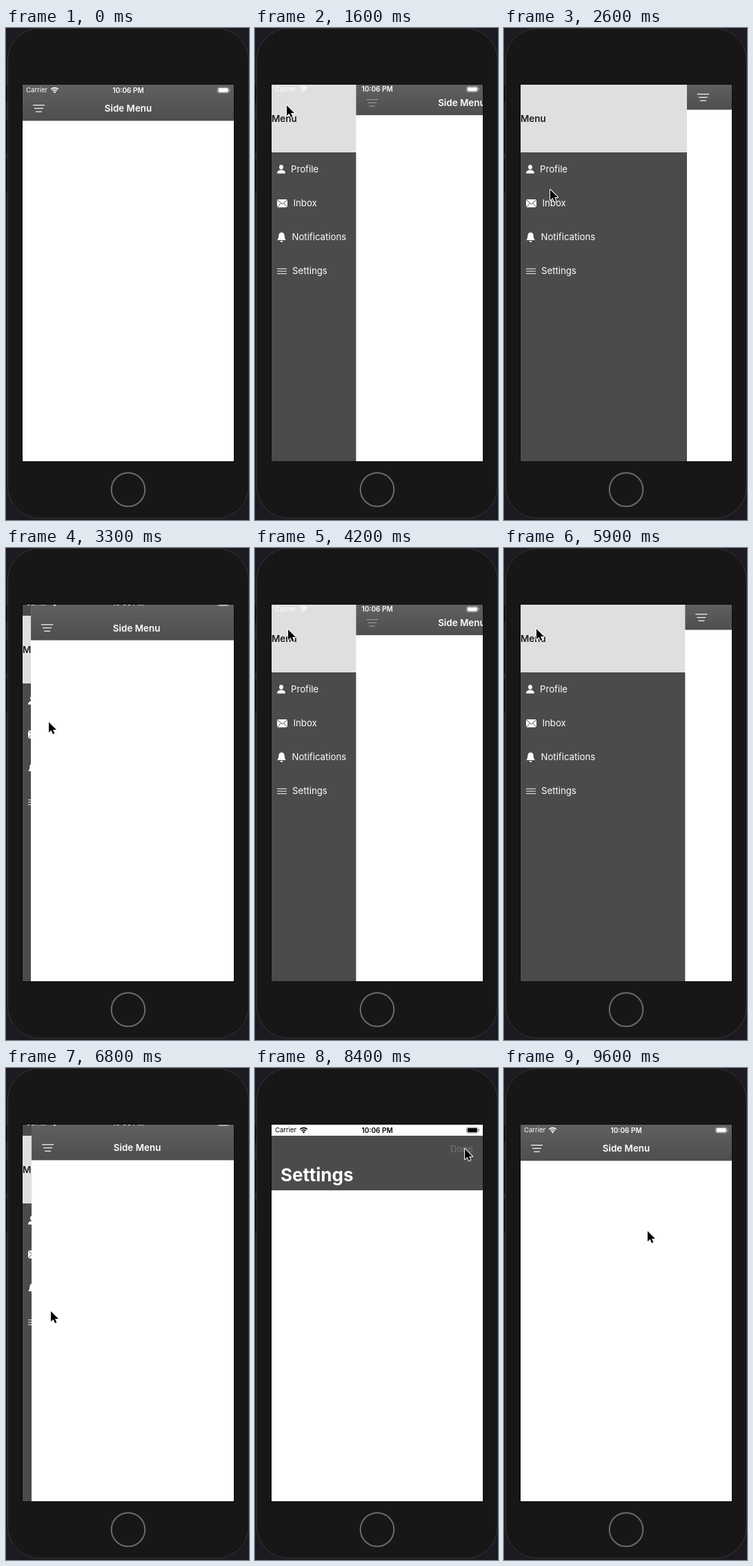
These frames come from a looping animation (352x712 px, 9.7 s). An HTML page with a canvas:

```html
<!DOCTYPE html>
<html lang="en">
<head>
<meta charset="utf-8">
<title>Side Menu</title>
<style>
  html, body { margin: 0; width: 100%; height: 100%; overflow: hidden; background: #1b1b21; }
  canvas { display: block; width: 352px; height: 712px; }
</style>
</head>
<body>
<canvas id="stage"></canvas>
<script>
const LOOP = 9700, STEP = 100, SLIDE = 335, MENU_WIDTH = 241;
const SCREEN = { x: 24, y: 82, w: 306, h: 545 };
const OPENS = [1500, 4100, 5600];
const CLOSES = [3040, 4847, 6543];
// time, x, y of the pointer tip
const POINTER = [
  [100, 120, 608], [400, 96, 400], [800, 58, 165], [1000, 45, 124], [1300, 46, 112],
  [1900, 46, 112], [2500, 66, 231], [2600, 67, 234], [2700, 67, 234], [2900, 62, 252],
  [3300, 62, 252], [4000, 48, 118], [4400, 48, 118], [4800, 68, 202], [5100, 68, 202],
  [5500, 47, 117], [5900, 47, 117], [6400, 65, 352], [7400, 65, 352], [7600, 120, 345],
  [7700, 155, 332], [7900, 238, 240], [8200, 304, 117], [8500, 304, 117],
  [8800, 252, 200], [9100, 214, 228], [9300, 208, 236]
];

const canvas = document.getElementById('stage');
const ctx = canvas.getContext('2d');
const ratio = window.devicePixelRatio || 1;
canvas.width = 352 * ratio;
canvas.height = 712 * ratio;

const clamp = v => Math.min(1, Math.max(0, v));
const easeOut = (v, power = 2) => 1 - (1 - clamp(v)) ** power;

function rect(x, y, w, h, color) {
  ctx.fillStyle = color;
  ctx.fillRect(x, y, w, h);
}

function text(label, x, middle, size, weight, color, align = 'left') {
  ctx.font = `${weight} ${size}px Inter, sans-serif`;
  ctx.textAlign = align;
  ctx.fillStyle = color;
  ctx.fillText(label, x, middle + size * 0.36);
}

function roundRect(x, y, w, h, r) {
  ctx.beginPath();
  ctx.roundRect(x, y, w, h, r);
}

function line(x1, y1, x2, y2, color, width) {
  ctx.strokeStyle = color;
  ctx.lineWidth = width;
  ctx.beginPath();
  ctx.moveTo(x1, y1);
  ctx.lineTo(x2, y2);
  ctx.stroke();
}

function fillPath(path, color) {
  ctx.fillStyle = color;
  ctx.fill(new Path2D(path));
}

function drawPhone() {
  rect(0, 0, 352, 712, '#1b1b21');
  for (const [y, h] of [[83, 25], [134, 47], [190, 48]]) rect(0, y, 4, h, '#09090a');
  roundRect(2.5, 0.5, 349, 709, 46);
  ctx.fillStyle = '#171717';
  ctx.fill();
  ctx.strokeStyle = '#37373a';
  ctx.lineWidth = 1;
  ctx.stroke();
  ctx.strokeStyle = '#6a6a6a';
  ctx.lineWidth = 2;
  ctx.beginPath();
  ctx.arc(177, 668, 24.3, 0, 7);
  ctx.stroke();
  rect(23, 81, 308, 547, '#0b0b0b');
}

function drawStatusBar(color, dy) {
  const y = 90 + dy;
  text('Carrier', 29, y, 9.5, 400, color);
  text('10:06 PM', 177, y, 10, 600, color, 'center');
  ctx.strokeStyle = color;
  ctx.lineWidth = 1.6;
  for (const r of [4.4, 7.4]) {
    ctx.beginPath();
    ctx.arc(70.5, y + 4, r, -Math.PI * 0.75, -Math.PI * 0.25);
    ctx.stroke();
  }
  fillPath(`M70.5 ${y + 4.5}l-2 -2.3q2 -1.6 4 0z`, color);
  roundRect(306.5, y - 4, 16.5, 8, 2.3);
  ctx.globalAlpha = 0.5;
  ctx.lineWidth = 0.9;
  ctx.stroke();
  rect(324, y - 1.3, 1, 2.6, color);
  ctx.globalAlpha = 1;
  roundRect(307.7, y - 2.9, 14.1, 5.8, 1.4);
  ctx.fill();
}

function drawMenu(dy) {
  rect(24, 82, 306, 545, '#4b4b4b');
  ctx.save();
  ctx.translate(0, dy);
  rect(24, 82, MENU_WIDTH, 98, '#dfdfdf');
  text('Menu', 24, 131.5, 13.4, 600, '#1c1c1c');
  text('Profile', 52, 204.5, 13.2, 400, '#fff');
  text('Inbox', 55.5, 253.5, 13.2, 400, '#fff');
  text('Notifications', 53.5, 302.5, 13.2, 400, '#fff');
  text('Settings', 54, 351.5, 13.2, 400, '#fff');

  ctx.fillStyle = '#fff';
  ctx.beginPath();
  ctx.ellipse(38, 201.3, 2.9, 3.4, 0, 0, 7);
  ctx.fill();
  fillPath('M32 210.5q0 -5 6 -5t6 5z', '#fff');

  roundRect(32, 248, 15, 11.4, 2);
  ctx.fill();
  ctx.strokeStyle = '#4b4b4b';
  ctx.lineWidth = 1;
  ctx.stroke(new Path2D('M32.5 248.8l7 6.2l7 -6.2M32.5 258.8l5 -5.2M46.5 258.8l-5 -5.2'));

  fillPath('M32 307q2.3 -2 2.3 -6q0 -4.6 4.2 -5.2q4.2 .6 4.2 5.2q0 4 2.3 6z'
    + 'M36.4 308h4.2q-.6 2 -2.1 2t-2.1 -2z', '#fff');
  for (const y of [348.5, 352, 355.5]) line(32, y, 46, y, '#e4e4e4', 1.1);
  ctx.restore();
}

function drawMain(offset, pressed) {
  const lift = offset * 16 / MENU_WIDTH;
  const bottom = 134.3 - lift;
  ctx.save();
  ctx.translate(offset, 0);
  rect(24, 82, 306, 545, '#fff');
  const shade = ctx.createLinearGradient(0, 82, 0, bottom);
  shade.addColorStop(0, '#606060');
  shade.addColorStop(1, '#4e4e4e');
  rect(24, 82, 306, bottom - 82, shade);
  ctx.translate(0, -lift);
  text('Side Menu', 177, 116.5, 13.4, 600, '#fff', 'center');
  const color = pressed ? '#979797' : '#fff';
  [8.6, 6.4, 4.4].forEach((half, i) =>
    line(47.5 - half, 111.7 + i * 4.7, 47.5 + half, 111.7 + i * 4.7, color, 1.2));
  ctx.restore();
}

function drawSettings(dy, pressed) {
  ctx.save();
  ctx.translate(0, dy);
  rect(24, 82, 306, 545, '#fff');
  rect(24, 98, 306, 79, '#4b4b4b');
  text('Done', 316, 117, 13.2, 400, pressed ? '#757575' : '#fff', 'right');
  text('Settings', 37, 154.5, 26, 700, '#fff');
  ctx.restore();
}

function drawPointer(t) {
  if (t < POINTER[0][0]) return;
  let i = POINTER.findIndex(key => key[0] > t);
  if (i < 0) i = POINTER.length - 1;
  const [t0, x0, y0] = POINTER[i - 1], [t1, x1, y1] = POINTER[i];
  const k = clamp((t - t0) / (t1 - t0));
  ctx.save();
  ctx.translate(x0 + (x1 - x0) * k, y0 + (y1 - y0) * k);
  const arrow = new Path2D('M0 0V15L3.5 11.8L6 17.3L8.4 16.2L6 11H11Z');
  ctx.strokeStyle = '#fff';
  ctx.lineWidth = 2;
  ctx.lineJoin = 'round';
  ctx.stroke(arrow);
  ctx.fillStyle = '#000';
  ctx.fill(arrow);
  ctx.restore();
}

function menuState(t) {
  const opened = OPENS.filter(s => s <= t).pop() ?? -1e4;
  const closed = CLOSES.filter(s => s <= t).pop() ?? -1e4;
  const closing = closed >= opened;
  const k = clamp((t - Math.max(opened, closed)) / SLIDE);
  return closing
    ? { offset: MENU_WIDTH * (1 - easeOut(k)), listShift: 16, barShift: -16 * (1 - k ** 4), pressed: false }
    : { offset: MENU_WIDTH * easeOut(k), listShift: 0, barShift: -16 * k * k, pressed: k > 0 && k < 0.75 };
}

function draw(t) {
  ctx.setTransform(ratio, 0, 0, ratio, 0, 0);
  drawPhone();
  ctx.save();
  ctx.beginPath();
  ctx.rect(SCREEN.x, SCREEN.y, SCREEN.w, SCREEN.h);
  ctx.clip();
  const menu = menuState(t);
  drawMenu(menu.listShift);
  drawMain(menu.offset, menu.pressed);
  const shown = easeOut((t - 6880) / 500, 3) - easeOut((t - 8500) / 500, 3);
  if (shown > 0) drawSettings(SCREEN.h * (1 - shown), t >= 8400);
  drawStatusBar(shown > 0.9 ? '#000' : '#fff', menu.barShift);
  ctx.restore();
  drawPointer(t);
}

function frame() {
  const t = performance.now() % LOOP;
  draw(Math.floor(t / STEP) * STEP);
  requestAnimationFrame(frame);
}
frame();
</script>
</body>
</html>
```
